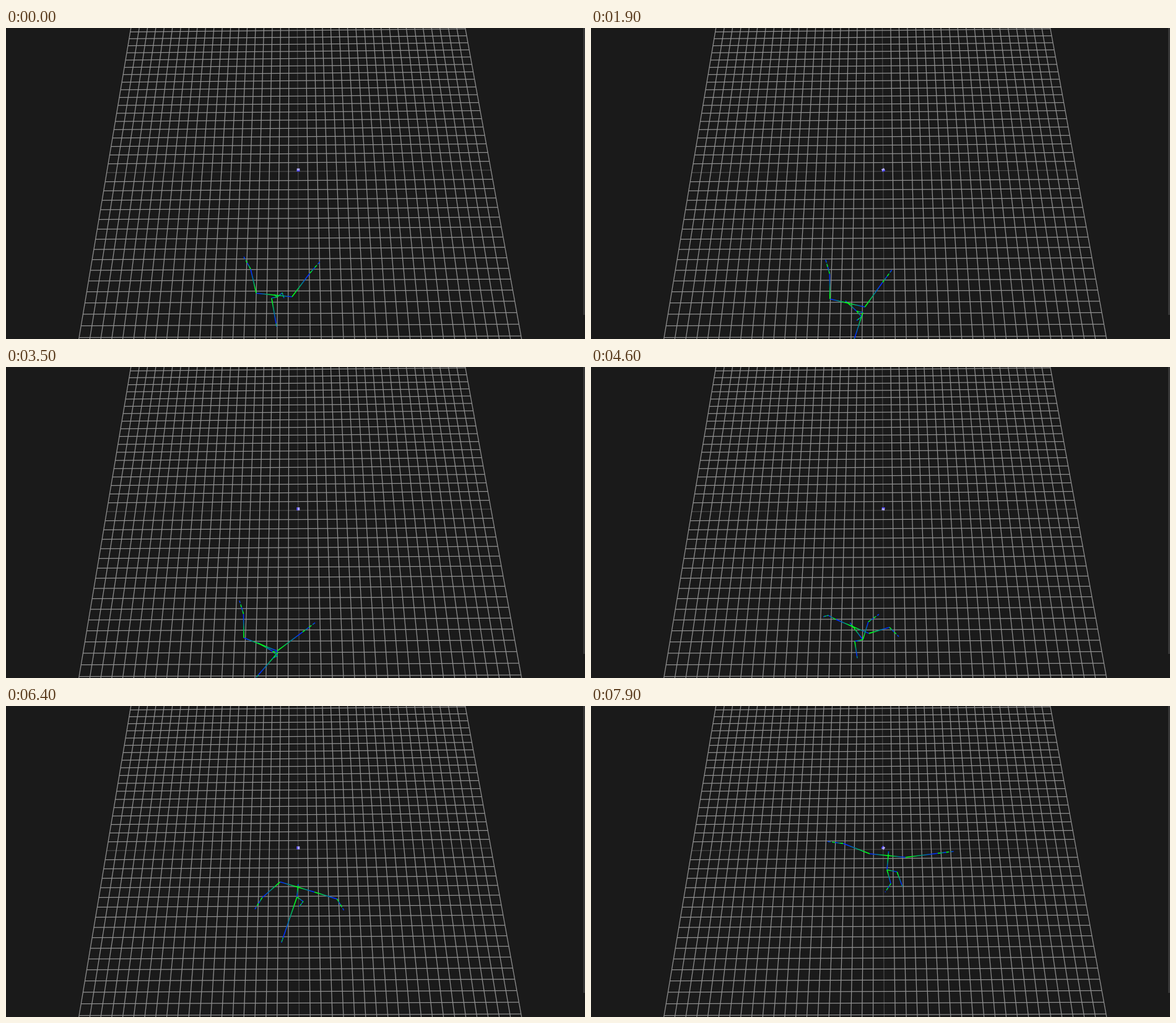
An HTML page with a canvas for the animation above (8 s loop, 935 by 503 pixels).

```html
<!DOCTYPE html>
<html>
<head>
<meta charset="utf-8">
<style>
html, body { margin: 0; width: 100%; height: 100%; overflow: hidden; background: #1a1a1a; }
canvas { display: block; }
</style>
</head>
<body>
<canvas id="stage" width="935" height="503"></canvas>
<script>
const ctx = document.getElementById('stage').getContext('2d');
const LOOP = 8000, STEP = 100;

// Key points of the dance; shoulders, hips, elbows and knees follow by rule.
const poses = [
  { at: 950, neck: [434, 432], pelvis: [438, 435], left: [384, 370], right: [507, 378], leg: [437, 483], bent: [449, 437] },
  { at: 1900, neck: [415, 445], pelvis: [429, 458], left: [379, 375], right: [486, 391], leg: [424, 507], bent: [429, 473] },
  { at: 3500, neck: [412, 449], pelvis: [431, 460], left: [377, 378], right: [500, 413], leg: [404, 502], bent: [430, 471] },
  { at: 4600, neck: [423, 420], pelvis: [439, 441], left: [375, 404], right: [497, 436], leg: [430, 471], bent: [465, 400] },
  { at: 5800, neck: [464, 321], pelvis: [464, 334], left: [408, 360], right: [542, 338], leg: [430, 412], bent: [472, 348] },
  { at: 7100, neck: [475, 269], pelvis: [474, 290], left: [388, 285], right: [549, 322], leg: [469, 346], bent: [475, 302] },
  { at: 7900, neck: [480, 242], pelvis: [478, 265], left: [381, 219], right: [587, 235], leg: [503, 292], bent: [475, 301] }
];

// Smooth curve through one key point of all poses.
function track(name, time) {
  const last = poses.length - 1;
  const t = Math.min(Math.max(time, poses[0].at), poses[last].at);
  let i = 0;
  while (i < last - 1 && t >= poses[i + 1].at) i++;
  const span = poses[i + 1].at - poses[i].at, s = (t - poses[i].at) / span;
  return [0, 1].map(n => {
    const slope = k => {
      const a = poses[Math.max(k - 1, 0)], b = poses[Math.min(k + 1, last)];
      return (b[name][n] - a[name][n]) / (b.at - a.at) * span;
    };
    const p = poses[i][name][n], q = poses[i + 1][name][n];
    return p + (q - p) * s * s * (3 - 2 * s)
      + slope(i) * s * (1 - s) ** 2 - slope(i + 1) * s * s * (1 - s);
  });
}

const distance = (a, b) => Math.hypot(b[0] - a[0], b[1] - a[1]);

// Point at a fraction of the way from a to b, pushed sideways.
function between(a, b, part, side = 0) {
  const dx = b[0] - a[0], dy = b[1] - a[1], d = Math.hypot(dx, dy) || 1;
  return [a[0] + dx * part + dy / d * side, a[1] + dy * part - dx / d * side];
}

function line(a, b, style, width) {
  ctx.strokeStyle = style;
  ctx.lineWidth = width;
  ctx.beginPath();
  ctx.moveTo(...a);
  ctx.lineTo(...b);
  ctx.stroke();
}

function bone(a, b, dash = []) {
  const g = ctx.createLinearGradient(...a, ...b);
  g.addColorStop(0.15, '#00ff20');
  g.addColorStop(0.5, '#009080');
  g.addColorStop(0.85, '#0030ff');
  ctx.setLineDash(dash);
  line(a, b, g, 1.6);
  ctx.setLineDash([]);
}

function limb(root, joint, end, part, bend) {
  const middle = between(joint, end, part, bend);
  const wrist = between(middle, end, 0.5);
  bone(root, joint);
  bone(joint, middle);
  bone(middle, wrist);
  bone(wrist, end, [5, 2]);
}

function drawDancer(time) {
  const t = Math.max(time, poses[0].at);
  const [neck, pelvis, left, right, leg, bent] =
    ['neck', 'pelvis', 'left', 'right', 'leg', 'bent'].map(name => track(name, t));
  const roll = 0.1 + 0.3 * Math.sin(Math.PI * (t - 950) / 6950);
  const shoulder = side => [neck[0] + side * Math.cos(roll), neck[1] + side * Math.sin(roll)];
  const sway = 17 * Math.sin(Math.PI * (t - 1400) / 2500);
  const hip = [pelvis[0] + sway, pelvis[1] + Math.abs(sway) / 5];
  const rightShoulder = shoulder(28);

  bone(neck, pelvis);
  bone(neck, between(neck, pelvis, -0.3));
  limb(neck, shoulder(-30), left, 0.64, -4);
  limb(neck, rightShoulder, right, 0.66, Math.max(0, 75 - distance(rightShoulder, right)) / 2);
  limb(pelvis, hip, leg, 0.9, 0);
  limb(pelvis, pelvis, bent, 0.6, 8);
}

// Floor coordinates to the stage, in perspective.
function floor(u, v) {
  const k = 0.00815, w = 1 - k * v - 0.00018 * u;
  return [(471.8 + 15.43 * u - 461 * k * v) / w, (232 - 0.142 * u + 1551 * k * v) / w];
}

function drawFloor() {
  for (const axis of [true, false]) {
    for (let i = -20; i <= 20; i++) {
      if ((i === 0) !== axis) continue;
      const color = axis ? '#484848' : '#909090';
      line(floor(i, -20), floor(i, 20), color, 1.25);
      line(floor(-20, i), floor(20, i), color, 1.25);
    }
  }
}

function drawMarker(step) {
  ctx.save();
  ctx.translate(472, 229.5);
  ctx.rotate(step * 1.3);
  ctx.fillStyle = '#b0a8ff';
  ctx.fillRect(-2.3, -2.3, 4.6, 4.6);
  ctx.fillStyle = '#4038ff';
  ctx.fillRect(-2.3, 1, 4.6, 1.6);
  ctx.restore();
}

function draw(now) {
  const step = Math.floor(now % LOOP / STEP);
  ctx.fillStyle = '#1a1a1a';
  ctx.fillRect(0, 0, 935, 503);
  drawFloor();
  ctx.fillStyle = '#383838';
  ctx.fillRect(932, 0, 3, 464);
  drawMarker(step);
  drawDancer(step * STEP);
}

const start = performance.now();
function tick() {
  draw(performance.now() - start);
  requestAnimationFrame(tick);
}
tick();
</script>
</body>
</html>
```
